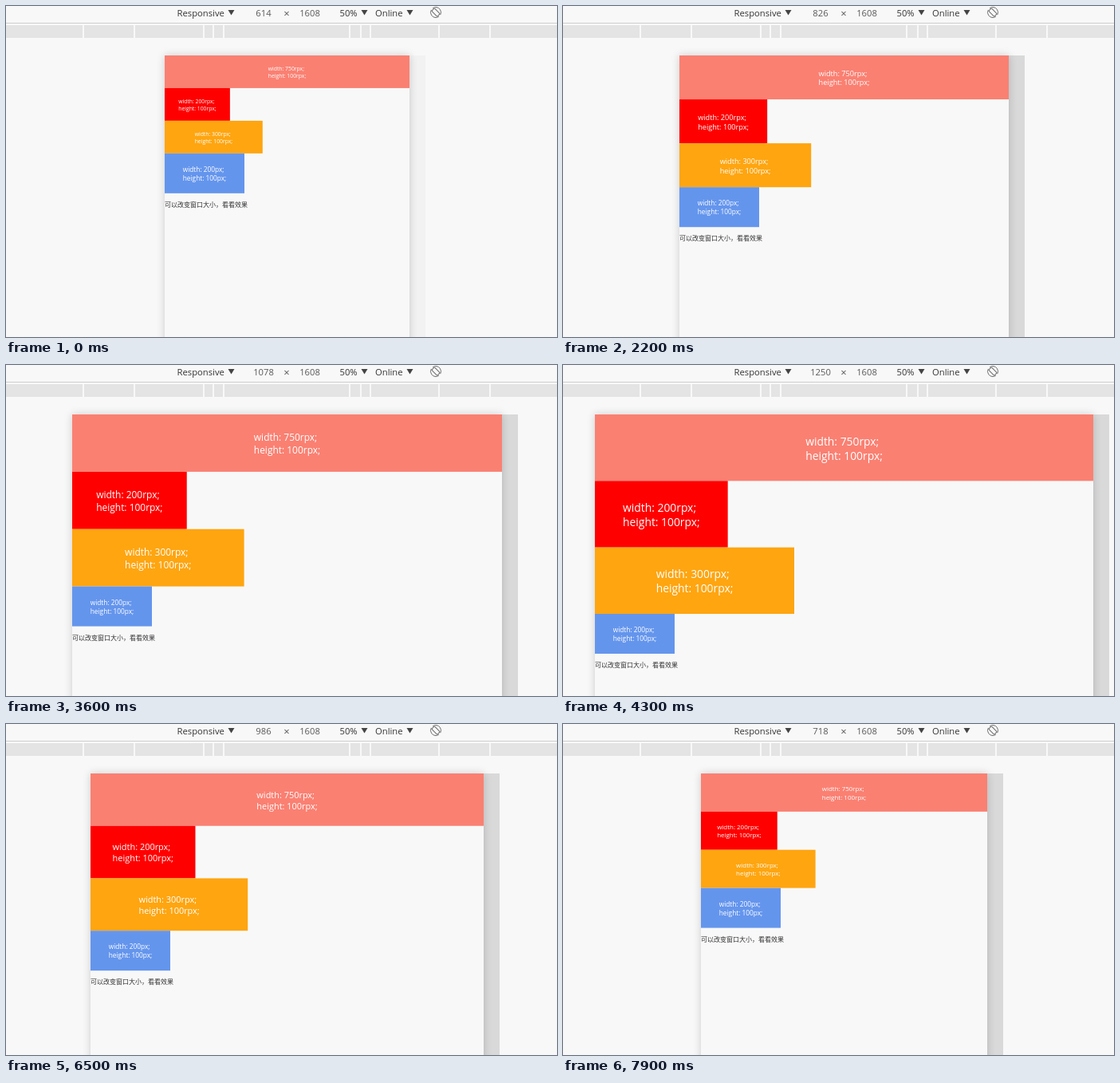
Write an HTML page with a canvas that moves like this. It is 691 px wide and 415 px high and loops after 8000 ms.

```html
<!DOCTYPE html>
<html lang="zh-CN">
<head>
<meta charset="utf-8">
<title>Responsive units</title>
<style>
  html, body { margin: 0; width: 100%; height: 100%; overflow: hidden; background: #f8f8f8; }
  canvas { display: block; }
</style>
</head>
<body>
<canvas id="stage" width="691" height="415"></canvas>
<script>
const ctx = document.getElementById('stage').getContext('2d');
const WIDTH = 691, HEIGHT = 415, LOOP = 8000, STEP = 100;
const CENTER = 352.5, TOP = 62, HANDLE = 20, BG = '#f8f8f8';
const SANS = '"Open Sans", "Noto Sans", sans-serif';
const CJK = '"Noto Sans CJK SC", "Noto Sans CJK", sans-serif';

// [time, viewport width]
const KEYS = [
  [800, 614], [1500, 714], [1700, 742], [2600, 890], [2900, 954], [3500, 1042],
  [3900, 1190], [4000, 1190], [4300, 1250], [4700, 1294], [5200, 1294],
  [5300, 1274], [6100, 1062], [6500, 986], [7000, 874], [7900, 718]
];
const RULER_GAPS = [96, 160, 247, 259, 272, 430, 444, 456, 542, 606];

function viewportAt(time) {
  const t = Math.floor(time / STEP) * STEP;
  const i = KEYS.findIndex(key => key[0] >= t);
  if (i < 0) return KEYS[KEYS.length - 1][1];
  if (i === 0) return KEYS[0][1];
  const [t0, w0] = KEYS[i - 1], [t1, w1] = KEYS[i];
  const w = w0 + (w1 - w0) * (t - t0) / (t1 - t0);
  return Math.round((w - 2) / 4) * 4 + 2; // resizes in steps of four
}

function rect(x, y, w, h, color) {
  ctx.fillStyle = color;
  ctx.fillRect(x, y, w, h);
}

function text(str, x, y, font, color, align = 'left') {
  ctx.font = font;
  ctx.fillStyle = color;
  ctx.textAlign = align;
  ctx.fillText(str, x, y);
}

function arrow(x) {
  ctx.fillStyle = '#444';
  ctx.beginPath();
  ctx.moveTo(x - 4, 5);
  ctx.lineTo(x + 4, 5);
  ctx.lineTo(x, 11.5);
  ctx.fill();
}

function rotateIcon(x, y) {
  ctx.save();
  ctx.translate(x, y);
  ctx.strokeStyle = '#6e6e6e';
  ctx.lineWidth = 1;
  for (const start of [-2.2, 0.94]) {
    ctx.beginPath();
    ctx.arc(0, 0, 6.5, start, start + 2.7);
    ctx.stroke();
  }
  ctx.rotate(-Math.PI / 4);
  ctx.beginPath();
  ctx.roundRect(-2.5, -5, 5, 10, 1);
  ctx.stroke();
  ctx.restore();
}

function drawToolbar(viewport) {
  const font = '11.25px ' + SANS, dark = '#333', gray = '#5a5a5a';
  text('Responsive', 214.5, 13, font, dark);
  text(viewport, 323, 13, font, gray, 'center');
  text('×', 352, 14, '13px ' + SANS, gray, 'center');
  text('1608', 381, 13, font, gray, 'center');
  text('50%', 418.5, 13, font, dark);
  text('Online', 463, 13, font, dark);
  [282.5, 449.5, 506.5].forEach(arrow);
  rotateIcon(539, 8);

  rect(0, 21, WIDTH, 1, '#cdcdcd');
  rect(0, 24, WIDTH, 16, '#e4e4e4');
  for (const x of RULER_GAPS) rect(x, 24, 2, 16, BG);
}

function drawBox(x, y, w, h, color, size, unit, em) {
  rect(x, y, w, h, color);
  const font = `500 ${em * 0.925}px ${SANS}`;
  const lines = [`width: ${size}${unit};`, `height: 100${unit};`];
  ctx.font = font;
  const left = x + (w - ctx.measureText(lines[1]).width) / 2;
  const base = y + h / 2 + em * 0.4;
  text(lines[0], left, base - em * 0.6, font, '#fff');
  text(lines[1], left, base + em * 0.6, font, '#fff');
}

function drawPage(viewport, handleColor) {
  const w = viewport / 2, x = CENTER - w / 2, rpx = w / 750;
  rect(x + w, TOP, HANDLE, HEIGHT - TOP, handleColor);

  ctx.save();
  ctx.shadowColor = 'rgba(0, 0, 0, 0.18)';
  ctx.shadowBlur = 10;
  rect(x, TOP, w, HEIGHT, BG);
  ctx.restore();

  const h = 100 * rpx, em = 18 * rpx;
  drawBox(x, TOP, w, h, '#fa8072', 750, 'rpx', em);
  drawBox(x, TOP + h, 200 * rpx, h, '#ff0000', 200, 'rpx', em);
  drawBox(x, TOP + 2 * h, 300 * rpx, h, '#ffa510', 300, 'rpx', em);
  const y = TOP + 3 * h;
  drawBox(x, y, 100, 50, '#6495ed', 200, 'px', 9);
  text('可以改变窗口大小，看看效果', x, y + 67, '8px ' + CJK, '#333');
}

function draw(now) {
  const time = now % LOOP;
  const viewport = viewportAt(time);
  rect(0, 0, WIDTH, HEIGHT, BG);
  drawPage(viewport, time < 500 ? '#f2f2f2' : '#d9d9d9');
  drawToolbar(viewport);
  requestAnimationFrame(draw);
}
draw(performance.now());
</script>
</body>
</html>
```
